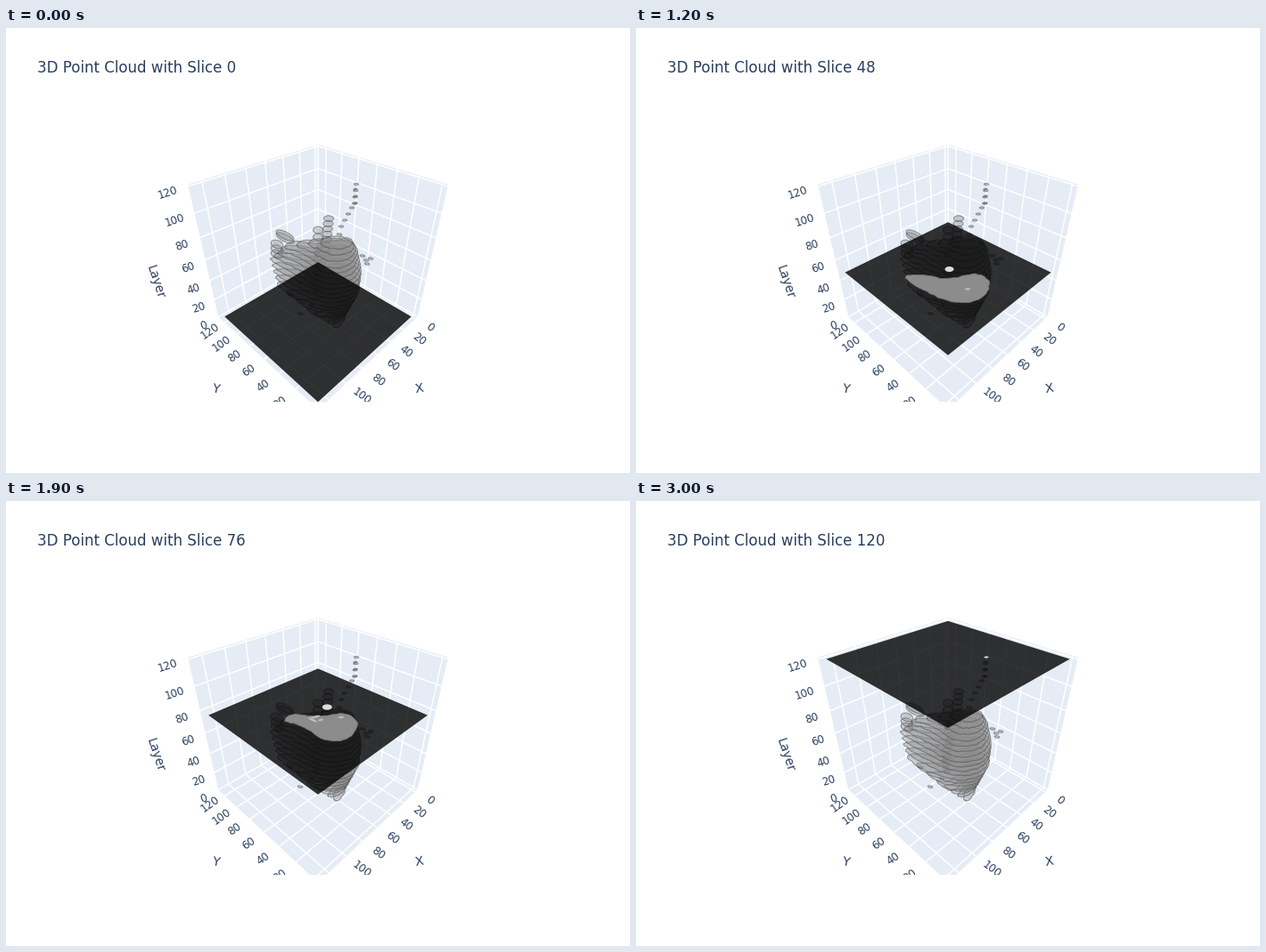
A matplotlib script that plays this animation: 700x500 px, repeating every 3100 ms.

```python
import numpy as np
import matplotlib.pyplot as plt
from matplotlib.animation import FuncAnimation
from matplotlib.patches import Polygon

W, H, DPI = 700, 500, 100
FRAMES, STEP, INTERVAL = 31, 4, 100
INK, WALL = "#2a3f5f", "#E5ECF6"
PX = 72 / DPI
FOCAL = 160 / np.tan(np.pi / 8)
PAD = 0.5 / 1.0625          # data half-width inside the unit cube
Z_TOP = 121

plt.rcParams["font.family"] = "DejaVu Sans"


def project(a, b, c):
    """Perspective view of the unit cube from (1.25, 1.25, 1.25)."""
    depth = 1.25 * 3 ** 0.5 - (a + b + c) / 3 ** 0.5
    right = (b - a) / 2 ** 0.5
    up = (2 * c - a - b) / 6 ** 0.5
    return 350 + FOCAL * right / depth, 260 - FOCAL * up / depth


def cube_x(x):
    return -PAD + 2 * PAD * x / 127


def cube_y(y):
    return PAD - 2 * PAD * y / 127


def cube_z(z):
    return -0.5 + z / Z_TOP


def gray(level):
    return (level / 255,) * 3


def ellipse(x, y, rx, ry, tilt=0, n=24):
    """Points from the left end, over the top."""
    t = np.pi + np.linspace(0, 2 * np.pi, n, endpoint=False)
    c, s = np.cos(np.radians(tilt)), np.sin(np.radians(tilt))
    u, v = rx * np.cos(t), ry * np.sin(t)
    return np.column_stack([x + u * c - v * s, y + u * s + v * c])


def smooth(pts, n=8):
    """Closed Catmull-Rom curve."""
    p0, p2, p3 = (np.roll(pts, s, axis=0) for s in (1, -1, -2))
    t = np.linspace(0, 1, n, endpoint=False)[None, :, None]
    p0, p1, p2, p3 = (p[:, None, :] for p in (p0, pts, p2, p3))
    curve = p1 + 0.5 * t * (p2 - p0 + t * (
        2 * p0 - 5 * p1 + 4 * p2 - p3 + t * (3 * (p1 - p2) + p3 - p0)))
    return curve.reshape(-1, 2)


# Outline of the large organ by height, from its left tip over the top.
ORGAN = {
    16: ellipse(374, 328, 10, 5, -60, n=8),
    32: [(337, 314), (349, 315), (364, 306), (378, 301),
         (388, 305), (383, 318), (366, 324), (347, 322)],
    44: [(304, 287), (322, 284), (352, 288), (382, 282),
         (396, 292), (386, 309), (358, 313), (322, 301)],
    60: [(297, 260), (310, 257), (340, 261), (378, 259),
         (398, 269), (389, 288), (358, 293), (322, 275)],
    76: [(313, 247), (322, 240), (350, 242), (379, 239),
         (394, 249), (386, 265), (360, 269), (332, 253)],
    88: ellipse(371, 241, 18, 7, n=8),
}
KEYS = np.array(list(ORGAN))
SHAPES = np.array([np.ravel(shape) for shape in ORGAN.values()])

# Vessels: height and place at both ends, radii.
VESSELS = [
    ((16, 349, 304), (28, 347, 292), (3.5, 2.2)),
    ((28, 350, 291), (36, 348, 285), (5.5, 2.2)),
    ((40, 348, 280), (56, 355, 262), (5, 3)),
    ((56, 348, 256), (64, 351, 247), (2, 6)),
    ((60, 358, 255), (88, 362, 214), (5.5, 3.2)),
    ((80, 350, 235), (84, 350, 227), (5.5, 4)),
    ((92, 376, 223), (104, 388, 202), (2.6, 1.1)),
    ((108, 391, 197), (120, 393, 175.5), (2.6, 1.1)),
]
# Loose specks: height and place.
SPECKS = [(12, 330, 321), (16, 343, 312), (32, 345, 292), (32, 350, 283),
          (32, 339, 275), (32, 319, 299), (32, 370, 293), (56, 405, 265),
          (64, 404, 261), (64, 409, 259), (68, 400, 256), (88, 374, 232)]
# Bright streaks inside the organ: height and place.
STREAKS = [(46, 372, 296), (60, 349, 273), (60, 371, 267), (60, 388, 270),
           (60, 329, 268), (76, 347, 242.5), (76, 353, 246),
           (76, 344, 246), (76, 376, 243)]


def organ_at(z):
    if not KEYS[0] <= z <= KEYS[-1]:
        return None
    flat = [np.interp(z, KEYS, col) for col in SHAPES.T]
    rng = np.random.default_rng(z)
    curve = smooth(np.reshape(flat, (-1, 2)))
    return curve + rng.normal(0, 0.35, curve.shape)


def parts_at(z):
    """Small parts cut at height z, with their brightness."""
    for (z0, x0, y0), (z1, x1, y1), radii in VESSELS:
        if z0 <= z <= z1:
            k = (z - z0) / (z1 - z0)
            yield ellipse(x0 + k * (x1 - x0), y0 + k * (y1 - y0), *radii), 220
    for z0, x, y in SPECKS:
        if z == z0:
            yield ellipse(x, y, 2.8, 1.2, 10), 205
    if z in (96, 104, 112):
        yield ellipse(392, 293 - z, 2, 0.9, -15), 205
    if 64 <= z <= 72:
        yield ellipse(304, 342 - 1.375 * z, 7, 4.5, 20), 145
    if z in (80, 84):
        yield ellipse(313, 296 - 0.75 * z, 11, 4, 27), 145


def streaks_at(z):
    if abs(z - 60) <= 4:
        y = 266.5 - 1.3 * (z - 60)
        yield ellipse(340, y, 5.5, 4), 45
        yield ellipse(341, y + 1.5, 2.8, 1.8), 165
    for i, (z0, x, y) in enumerate(STREAKS):
        if abs(z - z0) <= 6:
            tilt = 25 * np.sin(2 * i)
            yield ellipse(x, y - 1.3 * (z - z0), 3 + i % 2 * 2.5, 1.3,
                          tilt), 187


fig = plt.figure(figsize=(W / DPI, H / DPI), dpi=DPI, facecolor="white")
ax = fig.add_axes([80 / W, 80 / H, 540 / W, 320 / H])
ax.set_xlim(80, 620)
ax.set_ylim(420, 100)
ax.axis("off")


def add_poly(pts, **style):
    return ax.add_patch(Polygon(pts, closed=True, **style))


def line(p, q):
    (x0, y0), (x1, y1) = project(*p), project(*q)
    ax.plot([x0, x1], [y0, y1], color="white", lw=1.5 * PX, zorder=1)


def label(x, y, text, angle, size=12):
    ax.text(x, y, text, rotation=angle, size=size * PX, color=INK,
            ha="center", va="center", clip_on=True, zorder=6)


def draw_box():
    h = 0.5
    square = [(-h, -h), (h, -h), (h, h), (-h, h)]
    walls = [[(u, v, -h) for u, v in square],
             [(u, -h, v) for u, v in square],
             [(-h, u, v) for u, v in square]]
    for wall in walls:
        add_poly([project(*p) for p in wall], fc=WALL, ec=WALL,
                 lw=0.5, zorder=0)
    for v in range(0, 121, 20):
        a, b, c = cube_x(v), cube_y(v), cube_z(v)
        line((a, -h, -h), (a, -h, h))
        line((a, -h, -h), (a, h, -h))
        line((-h, b, -h), (-h, b, h))
        line((-h, b, -h), (h, b, -h))
        line((-h, -h, c), (h, -h, c))
        line((-h, -h, c), (-h, h, c))
        label(*project(a, 0.62, -h), v, -37)
        label(*project(0.62, b, -h), v, 35)
        label(*project(0.62, -h, c), v, 18)
    line((-h, -h, -h), (-h, -h, h))
    label(464, 405.5, "X", 10, 14)
    label(236, 405.5, "Y", -10, 14)
    label(167, 285, "Layer", -72, 14)


def draw_cloud():
    for z in range(0, 121, STEP):
        shapes = [pts for pts, _ in parts_at(z)]
        body = organ_at(z)
        if body is not None:
            shapes.append(body)
        for pts in shapes:
            add_poly(pts, fc=gray(138) + (0.38,), ec=gray(70) + (0.5,),
                     lw=1.1 * PX, zorder=2)


draw_box()
draw_cloud()
plane = add_poly([(0, 0)] * 4, fc=(0, 0, 0, 0.8), ec="none", zorder=3)
title = fig.text(35 / W, 1 - 50 / H, "", size=16.6 * PX, color=INK,
                 ha="left", va="baseline")
section = []


def update(i):
    z = i * STEP
    title.set_text(f"3D Point Cloud with Slice {z}")
    corners = [(-PAD, -PAD), (PAD, -PAD), (PAD, PAD), (-PAD, PAD)]
    plane.set_xy([project(a, b, cube_z(z)) for a, b in corners])
    while section:
        section.pop().remove()
    body = organ_at(z)
    if body is not None:
        section.append(add_poly(body, fc=gray(140), ec=gray(118),
                                lw=0.8 * PX, zorder=4))
        for pts, level in streaks_at(z):
            section.append(add_poly(pts, fc=gray(level), ec="none", zorder=4))
    for pts, level in parts_at(z):
        section.append(add_poly(pts, fc=gray(level), ec="none", zorder=5))
    return [title, plane, *section]


anim = FuncAnimation(fig, update, frames=FRAMES, interval=INTERVAL,
                     repeat=True, repeat_delay=0, blit=False)
plt.show()
```
